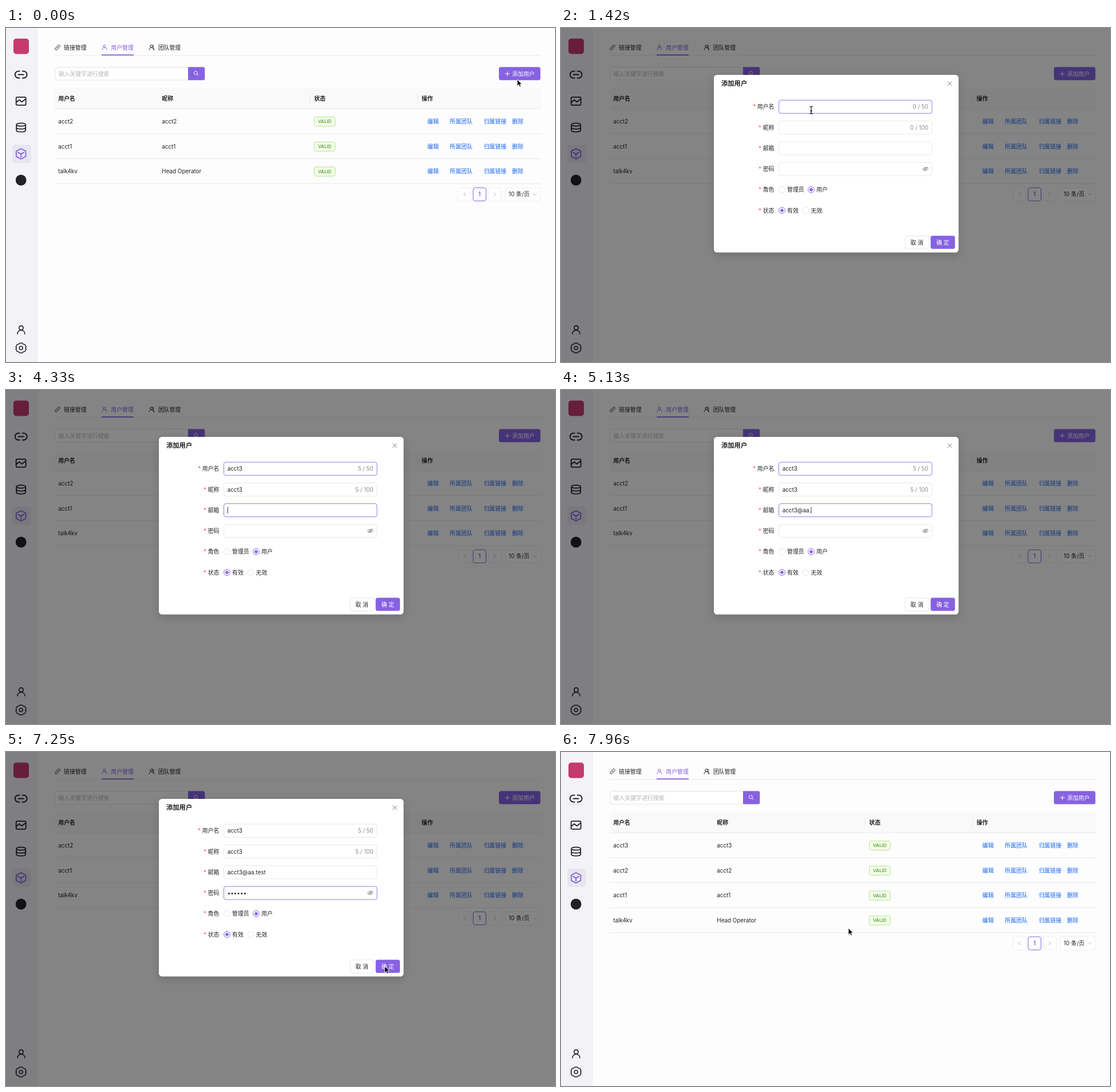
Animation of 959 by 584 pixels, one loop 8000 ms. Source, as an HTML page:

```html
<!DOCTYPE html>
<html lang="zh">
<head>
<meta charset="utf-8">
<title>用户管理</title>
<style>
  html, body { margin: 0; width: 100%; height: 100%; overflow: hidden; background: #fdfdfd; }
  svg { display: block; width: 100vw; height: 100vh; }
  text { font-family: Inter, "Noto Sans CJK SC", "Noto Sans CJK", sans-serif; white-space: pre; }
  .modal { filter: drop-shadow(0 4px 7px rgba(0, 0, 0, .16)); }
</style>
</head>
<body>
<svg id="stage" viewBox="0 0 959 584" preserveAspectRatio="none"></svg>
<script>
const LOOP = 8000, PURPLE = '#8662e3', INK = '#222226', LINE = '#e9e9ec', HINT = '#8c8c90';
const ROW = 43.7, OPEN = 723, CLOSE = 7352, RELOAD = 7630;
const ORIGIN = [887, 84], MASK = 0.48;

// Markup helpers; text is placed by its vertical centre.
const text = (x, y, s, o = {}) =>
  `<text x="${x}" y="${y + (o.size || 9.9) * 0.36}" font-size="${o.size || 9.9}" fill="${o.fill || INK}"
    font-weight="${o.weight || 400}" text-anchor="${o.anchor || 'start'}" ${o.id ? `id="${o.id}"` : ''}>${s}</text>`;
const box = (x, y, w, h, r, fill, stroke = 'none', extra = '') =>
  `<rect x="${x}" y="${y}" width="${w}" height="${h}" rx="${r}" fill="${fill}" stroke="${stroke}" ${extra}/>`;
const icon = (x, y, d, o = {}) =>
  `<path transform="translate(${x} ${y})" d="${d}" fill="none" stroke="${o.stroke || INK}"
    stroke-width="${o.width || 1.8}" stroke-linecap="round" stroke-linejoin="round"/>`;
const hline = (x1, x2, y) => `<path d="M${x1} ${y}H${x2}" stroke="${LINE}"/>`;
const group = (id, body, attrs = '') => `<g id="${id}" ${attrs}>${body}</g>`;

const person = 'M-3.7 -3.2a3.7 3.7 0 1 0 7.4 0a3.7 3.7 0 1 0 -7.4 0M-6.5 7.5C-6.5 -1.4 6.5 -1.4 6.5 7.5';
const smallPerson = 'M-2.2 -2a2.2 2.2 0 1 0 4.4 0a2.2 2.2 0 1 0 -4.4 0M-4 4.3C-4 -.9 4 -.9 4 4.3';
const team = smallPerson + 'M2 -4.2C5 -3.5 4.6 .3 2.2 .6C3.8 1.3 4.4 2.6 4.6 4';
const chain = 'M-1.2 -1.6L1 -3.8C3 -5.4 5.2 -3 3.8 -1.2L1.6 1M1.2 1.6L-1 3.8C-3 5.4 -5.2 3 -3.8 1.2L-1.6 -1M-1.1 1.1L1.1 -1.1';
const link = 'M-2.6 -6H-4.4A6 6 0 0 0 -4.4 6H-2.6M2.6 -6H4.4A6 6 0 0 1 4.4 6H2.6M-4.5 0H4.5';
const chart = 'M-6.5 -7H6.5Q8.5 -7 8.5 -5V5Q8.5 7 6.5 7H-6.5Q-8.5 7 -8.5 5V-5Q-8.5 -7 -6.5 -7ZM-8 2L-3 -2L1.5 1.5L8 -3.5';
const database = 'M-8 -5C-8 -8.6 8 -8.6 8 -5C8 -1.6 -8 -1.6 -8 -5V5C-8 8.6 8 8.6 8 5V-5M-8 0C-8 3.6 8 3.6 8 0';
const cube = 'M0 -9L8.3 -4.6V4.6L0 9L-8.3 4.6V-4.6ZM-5 -2.4L0 .4L5 -2.4M0 .4V5.6';
const gear = 'M-2.6 -8.6H2.6L4 -6.4L6.8 -6.2L9 -1.9L7.6 0L9 1.9L6.8 6.2L4 6.4L2.6 8.6H-2.6L-4 6.4L-6.8 6.2L-9 1.9L-7.6 0L-9 -1.9L-6.8 -6.2L-4 -6.4Z'
  + 'M-3 0a3 3 0 1 0 6 0a3 3 0 1 0 -6 0';
const cross = 'M-3.4 -3.4L3.4 3.4M3.4 -3.4L-3.4 3.4';
const eye = 'M-4.6 0C-2.4 -3.8 2.4 -3.8 4.6 0C2.4 3.8 -2.4 3.8 -4.6 0ZM-1.4 0a1.4 1.4 0 1 0 2.8 0a1.4 1.4 0 1 0 -2.8 0M-3.6 3.4L3.6 -3.4';

const sidebar = () =>
  box(0, 0, 55, 584, 0, '#f3f3f7') + `<path d="M55 0V584" stroke="#ececf1"/>` +
  box(13, 18.5, 27, 27, 5, '#c43a6c') +
  box(11, 204, 33, 32, 5, '#e7e6ee') +
  icon(26.2, 81.5, link, { width: 2 }) + icon(26.2, 127.8, chart) + icon(26.2, 174, database) +
  icon(26.2, 220, cube, { stroke: PURPLE }) +
  `<circle cx="26.2" cy="266" r="9.4" fill="${INK}"/>` +
  icon(26.5, 527.5, person, { width: 1.6 }) + icon(26.2, 559.5, gear, { width: 1.5 });

const tabs = () =>
  hline(85, 935, 48) +
  icon(90, 34, chain, { width: 1 }) + text(101, 34, '链接管理', { weight: 500 }) +
  icon(172, 34, smallPerson, { width: 1, stroke: PURPLE }) + text(183.3, 34, '用户管理', { weight: 500, fill: PURPLE }) +
  icon(254, 34, team, { width: 1 }) + text(265.7, 34, '团队管理', { weight: 500 }) +
  box(167, 46.3, 56, 1.8, 0, PURPLE);

const toolbar = () =>
  box(85.5, 68.5, 233, 22.5, 3, '#fff', '#e4e4e8') + text(91.5, 80, '输入关键字进行搜索', { fill: '#b4b4b8' }) +
  `<path d="M318 68.3H344.3Q347.3 68.3 347.3 71.3V88.3Q347.3 91.3 344.3 91.3H318Z" fill="${PURPLE}"/>` +
  icon(332, 79.3, 'M-3.6 -.8a3 3 0 1 0 6 0a3 3 0 1 0 -6 0M1.6 1.5L4 4', { stroke: '#fff', width: 1 }) +
  box(861, 68.3, 72.5, 23, 3.5, PURPLE) +
  icon(875.8, 80, 'M-3.8 0H3.8M0 -3.8V3.8', { stroke: '#fff', width: 1 }) +
  text(884, 80, '添加用户', { fill: '#fff' });

const tableHead = () =>
  box(85, 105, 850, 36, 4, '#f9f9fa') + hline(85, 935, 141.2) +
  [531, 719].map(x => `<path d="M${x} 115V131" stroke="${LINE}"/>`).join('') +
  [[91.3, '用户名'], [272.3, '昵称'], [538.3, '状态'], [726, '操作']]
    .map(([x, s]) => text(x, 123, s, { weight: 600 })).join('');

const people = [['acct3', 'acct3'], ['acct2', 'acct2'], ['acct1', 'acct1'], ['talk4kv', 'Head Operator']];
const row = ([name, nick], i) => {
  const y = 163.4 + i * ROW;
  return group('row' + i, text(91.3, y, name) + text(272.3, y, nick) +
    box(538.5, y - 7.8, 36.5, 16, 2.8, '#f4fdea', '#b4e48e') +
    text(556.8, y, 'VALID', { size: 8.2, weight: 500, fill: '#4b9a28', anchor: 'middle' }) +
    [[736, '编辑'], [775.3, '所属团队'], [834.7, '归属链接'], [884, '删除']]
      .map(([x, s]) => text(x, y, s, { fill: '#1766ee' })).join('') +
    hline(85, 935, y + 21.4));
};

const pager = () => {
  const y = 334.6, arrow = (x, k) => box(x, y - 11.5, 22.5, 23, 3.5, '#fff', '#eeeef0') +
    icon(x + 11.2, y, `M${-2 * k} -3L${2 * k} 0L${-2 * k} 3`, { stroke: '#b8b8bc', width: 0.9 });
  return group('pager', arrow(790, -1) + arrow(842.5, 1) +
    box(816, y - 11.5, 22.5, 23, 3.5, '#fff', PURPLE) +
    text(827.2, y, '1', { fill: PURPLE, weight: 600, anchor: 'middle' }) +
    box(872, y - 11.5, 61.5, 23, 3.5, '#fff', '#eeeef0') + text(878, y, '10 条/页') +
    icon(924, y, 'M-3 -1.6L0 1.6L3 -1.6', { stroke: '#b8b8bc', width: 0.9 }));
};

// Form fields: when each takes the focus and when its text is typed.
const fields = [
  { label: '用户名', y: 137.7, max: 50, value: 'acct3', focus: 1500, from: 1790, to: 2450 },
  { label: '昵称', y: 174, max: 100, value: 'acct3', focus: 2850, from: 3100, to: 3800 },
  { label: '邮箱', y: 210.2, value: 'acct3@aa.test', focus: 4220, from: 4500, to: 5350 },
  { label: '密码', y: 246.5, value: '••••••', focus: 5430, from: 6080, to: 6650 }
];

const label = (s, y) => text(372.5, y, `<tspan fill="#ff4d4f">* </tspan>${s}`, { anchor: 'end' });
const radio = (x, y, s, on) =>
  `<circle cx="${x}" cy="${y}" r="5.4" fill="#fff" stroke="${on ? PURPLE : '#e6e6ea'}"/>` +
  (on ? `<circle cx="${x}" cy="${y}" r="2.8" fill="${PURPLE}"/>` : '') + text(x + 9, y, s);

const field = (f, i) =>
  label(f.label, f.y) +
  box(380.5, f.y - 11.5, 267.5, 23, 3.5, '#fff', LINE, `id="input${i}"`) +
  text(386.7, f.y, '', { id: 'value' + i }) +
  (f.max ? text(641.7, f.y, '', { id: 'count' + i, fill: HINT, anchor: 'end' }) : '');

const modal = () => group('modal',
  box(267, 82, 427.5, 310.5, 5.5, '#fff') +
  text(280, 97.2, '添加用户', { size: 11.3, weight: 600 }) +
  icon(679, 97.3, cross, { stroke: '#77777b', width: 1 }) +
  fields.map(field).join('') +
  icon(636.7, 246.3, eye, { stroke: '#77777b', width: 0.9 }) +
  label('角色', 282.7) + radio(386, 282.7, '管理员') + radio(437, 282.7, '用户', true) +
  label('状态', 319) + radio(386, 319, '有效', true) + radio(427.5, 319, '无效') +
  box(601, 363.7, 42, 22.5, 3.5, '#fff', '#e6e6ea') + text(621.7, 375, '取 消', { anchor: 'middle' }) +
  box(645.7, 363.3, 42.5, 23, 3.5, PURPLE) + text(667, 375, '确 定', { anchor: 'middle', fill: '#fff', weight: 500 }) +
  box(0, 0, 0.9, 11, 0, INK, 'none', 'id="caret"'), 'class="modal"');

const stage = document.getElementById('stage');
stage.innerHTML = box(0, 0, 959, 584, 0, '#fdfdfd') + sidebar() + tabs() + toolbar() + tableHead() +
  people.map(row).join('') + pager() +
  box(0, 0, 959, 584, 0, '#000', 'none', 'id="mask"') + modal() +
  group('arrow', '<path d="M0 0V11.4L2.6 9L4.4 13.1L6.4 12.2L4.6 8.3H8.2Z" fill="#000" stroke="#fff" stroke-width=".8"/>') +
  group('beam', icon(0, 0, 'M-2.6 -6.5Q0 -6.5 0 -4.8Q0 -6.5 2.6 -6.5M0 -5V5M-2.6 6.5Q0 6.5 0 4.8Q0 6.5 2.6 6.5M-1.5 1.6H1.5', { stroke: '#111', width: 1.2 }));

const el = {};
stage.querySelectorAll('[id]').forEach(n => { el[n.id] = n; });

const clamp = v => Math.min(1, Math.max(0, v));
const show = (node, on) => node.setAttribute('display', on ? 'inline' : 'none');
const move = (node, x, y) => node.setAttribute('transform', `translate(${x} ${y})`);

const bezier = (x1, y1, x2, y2) => p => {
  const at = (a, b, u) => 3 * a * u * (1 - u) ** 2 + 3 * b * u * u * (1 - u) + u ** 3;
  let lo = 0, hi = 1;
  for (let i = 0; i < 24; i++) {
    const mid = (lo + hi) / 2;
    if (at(x1, x2, mid) < p) lo = mid; else hi = mid;
  }
  return at(y1, y2, lo);
};
const easeIn = bezier(0.08, 0.82, 0.17, 1), easeOut = bezier(0.78, 0.14, 0.15, 0.86);

// Pointer path: time, x, y.
const path = [[0, 893, 90], [620, 892, 90], [710, 887, 87], [790, 839, 101], [1010, 600, 124], [1180, 480, 141], [1340, 437, 143.5],
  [6820, 437, 143.5], [7000, 530, 250], [7200, 662, 374], [7400, 660, 376], [7460, 654, 375], [7640, 600, 345], [7900, 502, 308], [LOOP, 502, 308]];
const pointer = t => {
  const i = path.findIndex((p, n) => n && t <= p[0]), [a, b] = [path[i - 1], path[i]];
  const k = (t - a[0]) / (b[0] - a[0]);
  return [a[1] + (b[1] - a[1]) * k, a[2] + (b[2] - a[2]) * k];
};

function drawForm(t, mx, my) {
  const active = fields.filter(f => t >= f.focus).length - 1;
  fields.forEach((f, i) => {
    const n = Math.floor(f.value.length * clamp((t - f.from) / (f.to - f.from)));
    const hover = mx > 380 && mx < 648 && Math.abs(my - f.y) < 12;
    el['value' + i].textContent = f.value.slice(0, n);
    if (f.max) el['count' + i].textContent = `${n} / ${f.max}`;
    el['input' + i].setAttribute('stroke', i === active || hover ? '#9678ea' : LINE);
  });
  const f = fields[active];
  const typing = f && t >= f.from && t < f.to;
  const since = f ? t - (t >= f.to ? f.to : f.focus) : 0;
  show(el.caret, f && t < 7210 && (typing || since % 1000 < 500));
  if (f) move(el.caret, 387 + el['value' + active].getComputedTextLength(), f.y - 5.5);
}

function draw(t) {
  const loaded = t >= RELOAD, shift = loaded ? 0 : -ROW;
  show(el.row0, loaded);
  [el.row1, el.row2, el.row3, el.pager].forEach(n => move(n, 0, shift));

  const open = t >= OPEN && t < CLOSE + 200;
  const k = t < CLOSE ? easeIn(clamp((t - OPEN) / 300)) : 1 - easeOut(clamp((t - CLOSE) / 200));
  const fade = t < CLOSE ? clamp((t - OPEN) / 130) : 1 - clamp((t - CLOSE) / 225);
  const scale = 0.2 + 0.8 * k, [ox, oy] = ORIGIN;
  const [mx, my] = pointer(t);
  el.mask.setAttribute('opacity', MASK * fade);
  show(el.modal, open);
  if (open) {
    el.modal.setAttribute('opacity', k);
    el.modal.setAttribute('transform', `translate(${ox} ${oy}) scale(${scale}) translate(${-ox} ${-oy})`);
    drawForm(t, mx, my);
  }

  const hidden = t >= fields[0].from && t < 6820;
  const inField = open && mx > 380 && mx < 648 && fields.some(f => Math.abs(my - f.y) < 11.5);
  show(el.arrow, !hidden && !inField);
  show(el.beam, !hidden && inField);
  move(el.arrow, mx, my);
  move(el.beam, mx, my);
}

function tick() {
  draw(performance.now() % LOOP);
  requestAnimationFrame(tick);
}
tick();
</script>
</body>
</html>
```
